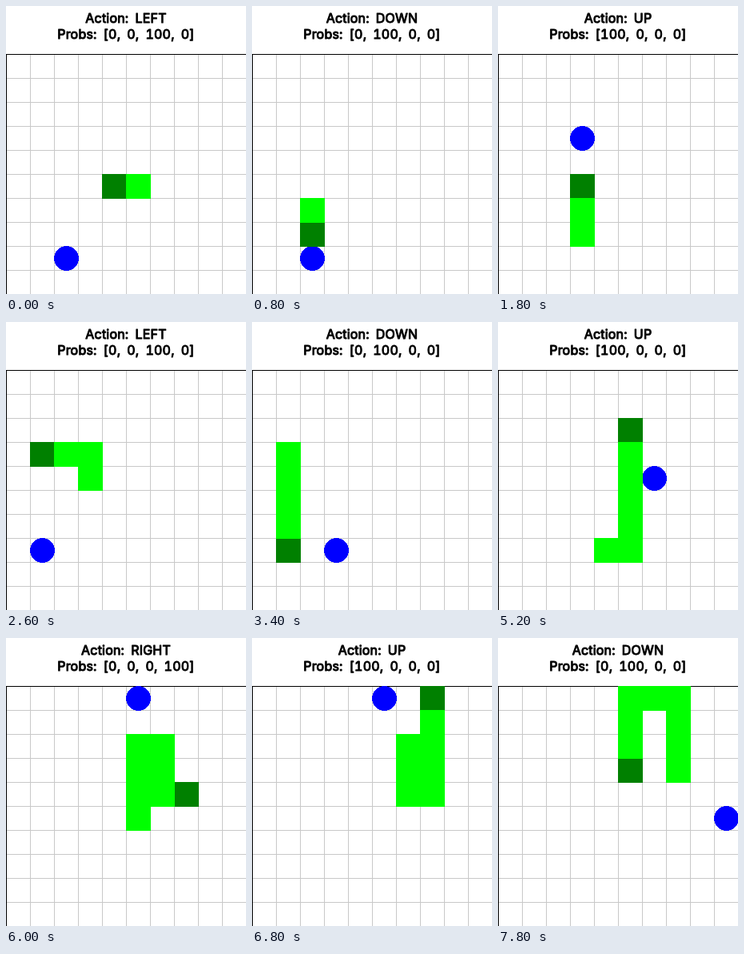
An HTML page that plays this animation: 300 px wide and 360 px high, repeating every 8000 ms.

```html
<!DOCTYPE html>
<html lang="en">
<head>
<meta charset="utf-8">
<title>Snake agent</title>
<style>
  html, body { margin: 0; width: 100%; height: 100%; overflow: hidden; background: #fff; }
  svg { display: block; width: 300px; height: 360px; }
  text {
    font: 400 16px Inter, "Open Sans", sans-serif;
    font-variant-numeric: tabular-nums;
    letter-spacing: .2px;
    word-spacing: 3.6px;
    text-anchor: middle;
    stroke: #000;
    stroke-width: 1;
    stroke-linejoin: round;
  }
</style>
</head>
<body>
<svg viewBox="0 0 300 360">
  <text id="action" x="150" y="21"></text>
  <text id="probs" x="150" y="41"></text>
  <g shape-rendering="crispEdges">
    <path id="grid" stroke="#c8c8c8"/>
    <path d="M0 60.5H300M.5 60V360" stroke="#000"/>
    <circle id="food" r="15.3" fill="#00f"/>
    <path id="head" fill="#008000"/>
    <path id="body" fill="#0f0"/>
  </g>
</svg>
<script>
const CELL = 30, TOP = 60, STEP_MS = 200;
const ACTIONS = {
  U: { name: 'UP', dx: 0, dy: -1 },
  D: { name: 'DOWN', dx: 0, dy: 1 },
  L: { name: 'LEFT', dx: -1, dy: 0 },
  R: { name: 'RIGHT', dx: 1, dy: 0 }
};
const MOVES = 'LLLDDDRUUUUULLDDDDRRRRUUUUURDDRUUUULLDDD';
const FOODS = [[2, 8], [3, 3], [1, 7], [3, 7], [5, 2], [6, 4], [5, 0], [9, 5]];

// Play the whole game once and keep the state after every move.
function simulate() {
  let snake = [[5, 5], [6, 5]], eaten = 0;
  return [...MOVES].map(key => {
    const { dx, dy } = ACTIONS[key];
    const [x, y] = snake[0];
    const head = [x + dx, y + dy];
    const ate = String(head) === String(FOODS[eaten]);
    snake = [head, ...(ate ? snake : snake.slice(0, -1))];
    if (ate) eaten++;
    return { key, snake, food: FOODS[eaten] };
  });
}

const el = id => document.getElementById(id);
const square = ([x, y]) => `M${x * CELL} ${TOP + y * CELL}h31v31h-31z`;
const states = simulate();
let shown = -1;

function draw(step) {
  const { key, snake, food } = states[step];
  const probs = Object.keys(ACTIONS).map(k => k === key ? 100 : 0);
  el('action').textContent = `Action: ${ACTIONS[key].name}`;
  el('probs').textContent = `Probs: [${probs.join(', ')}]`;
  el('head').setAttribute('d', square(snake[0]));
  el('body').setAttribute('d', snake.slice(1).map(square).join(''));
  el('food').setAttribute('cx', food[0] * CELL + 15.5);
  el('food').setAttribute('cy', TOP + food[1] * CELL + 15.5);
}

function tick(now) {
  const step = Math.floor(Math.max(0, now) / STEP_MS) % states.length;
  if (step !== shown) draw(shown = step);
  requestAnimationFrame(tick);
}

let lines = '';
for (let i = 1; i < 10; i++) {
  const at = i * CELL + .5;
  lines += `M${at} ${TOP}V360M0 ${TOP + at}H300`;
}
el('grid').setAttribute('d', lines);
draw(0);
requestAnimationFrame(tick);
</script>
</body>
</html>
```
